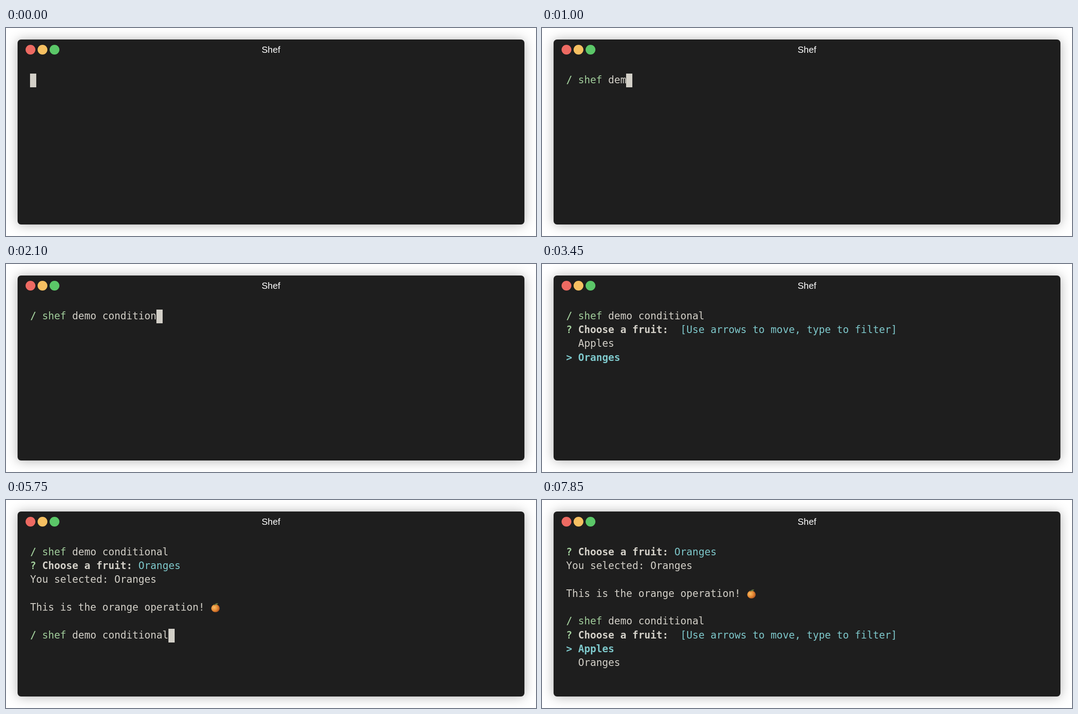
Recreate the animation shown at these times as an HTML page. Size 1191 px wide and 470 px high, loop 8000 ms.

```html
<!DOCTYPE html>
<html lang="en">
<head>
<meta charset="utf-8">
<title>Shef</title>
<style>
html, body { margin: 0; width: 100%; height: 100%; overflow: hidden; background: #fff; }
#win {
  position: absolute; left: 26px; top: 26px; width: 1139px; height: 418px;
  border-radius: 8px; background: #1e1e1e; box-shadow: 0 1px 26px rgba(0, 0, 0, .3);
}
#win i { position: absolute; top: 12px; width: 22px; height: 22px; border-radius: 50%; }
#title {
  position: absolute; top: 11px; width: 100%; text-align: center; color: #fff;
  font: 20.4px/24px "Liberation Sans", Arial, sans-serif;
}
#term {
  position: absolute; left: 54.2px; top: 101.5px; margin: 0; color: #d3d0c8;
  font: 22.46px/31.35px "DejaVu Sans Mono", monospace; font-variant-ligatures: none;
}
#cursor { position: absolute; width: 13.6px; height: 31.4px; background: #d3d0c8; }
.g { color: #a1cd9b; }
.c { color: #7ec8cb; }
.r { color: #ec6a66; }
b { font-weight: 700; }
svg { width: 21px; height: 22px; vertical-align: -4px; }
</style>
</head>
<body>
<div id="win">
  <i style="left:18px;background:#ed6a62"></i>
  <i style="left:45px;background:#f6c061"></i>
  <i style="left:72px;background:#5bc768"></i>
  <div id="title">Shef</div>
</div>
<div id="cursor"></div>
<pre id="term"></pre>
<script>
const LOOP = 8000, CELL = 13.522, ROW = 31.35, LEFT = 54.2, TOP = 102.5;
const COMMAND = 'shef demo conditional';
const term = document.getElementById('term');
const cursor = document.getElementById('cursor');

const tangerine = `<svg viewBox="0 0 21 22"><defs><radialGradient id="peel" cx=".35" cy=".4" r=".7">
<stop offset="0" stop-color="#f9bd62"/><stop offset=".55" stop-color="#e58a35"/><stop offset="1" stop-color="#a84d1c"/>
</radialGradient></defs><ellipse cx="10.7" cy="12.7" rx="9.5" ry="8.9" fill="url(#peel)"/>
<path d="M8 5Q11 0 17 1.5Q14 6 8 5Z" fill="#66793f"/><path d="M9 6L7 3" stroke="#5b5a30" stroke-width="1.3"/></svg>`;

// The shell marks a first word red until it names a known command.
function prompt(count) {
  const text = COMMAND.slice(0, count), word = text.slice(0, 4);
  const known = word === 'sh' || word === 'shef';
  const first = known ? `<span class="g">${word}</span>` : `<b class="r">${word}</b>`;
  return `<b class="g">/</b> ${first}${text.slice(4)}`;
}

const ask = '<b class="g">?</b> <b>Choose a fruit:</b> ';
const full = prompt(COMMAND.length);
const answer = ask + '<span class="c">Oranges</span>';
const report = ['You selected: Oranges', '', 'This is the orange operation! ' + tangerine, ''];

function menu(pick) {
  const items = ['Apples', 'Oranges'].map((name, i) =>
    i === pick ? `<b class="c">&gt; ${name}</b>` : '  ' + name);
  return [ask + ' <span class="c">[Use arrows to move, type to filter]</span>', ...items];
}

// Returns the visible lines and the cursor cell as [column, row], if any.
function screen(t) {
  if (t < 100) return [[], [0, 0]];
  if (t < 2400) {
    const n = Math.min(COMMAND.length, Math.max(0, Math.floor(t / 100) - 2));
    return [[prompt(n)], [n + 2, 0]];
  }
  if (t < 2450) return [[full], [0, 1]];
  if (t < 4450) return [[full, ...menu(t < 3450 ? 0 : 1)]];

  const done = [full, answer];
  if (t < 4550) return [done, [0, 2]];
  if (t < 4650) return [[...done, report[0]], [0, 3]];
  if (t < 4750) return [[...done, ...report], [0, 5]];

  const past = [...done, ...report];
  if (t < 5750) return [[...past, prompt(0)], [2, 6]];
  if (t < 6750) return [[...past, full], [COMMAND.length + 2, 6]];
  if (t < 6850) return [[...past, full], [0, 7]];
  const pick = t >= 7350 && t < 7850 ? 1 : 0;
  return [[...past.slice(1), full, ...menu(pick)]];
}

let shown = null;
function draw(now) {
  const [lines, cell] = screen(now % LOOP);
  const html = lines.join('\n');
  if (html !== shown) term.innerHTML = shown = html;
  cursor.hidden = !cell;
  if (cell) {
    cursor.style.left = LEFT + cell[0] * CELL + 'px';
    cursor.style.top = TOP + cell[1] * ROW + 'px';
  }
  requestAnimationFrame(draw);
}
draw(performance.now());
</script>
</body>
</html>
```
